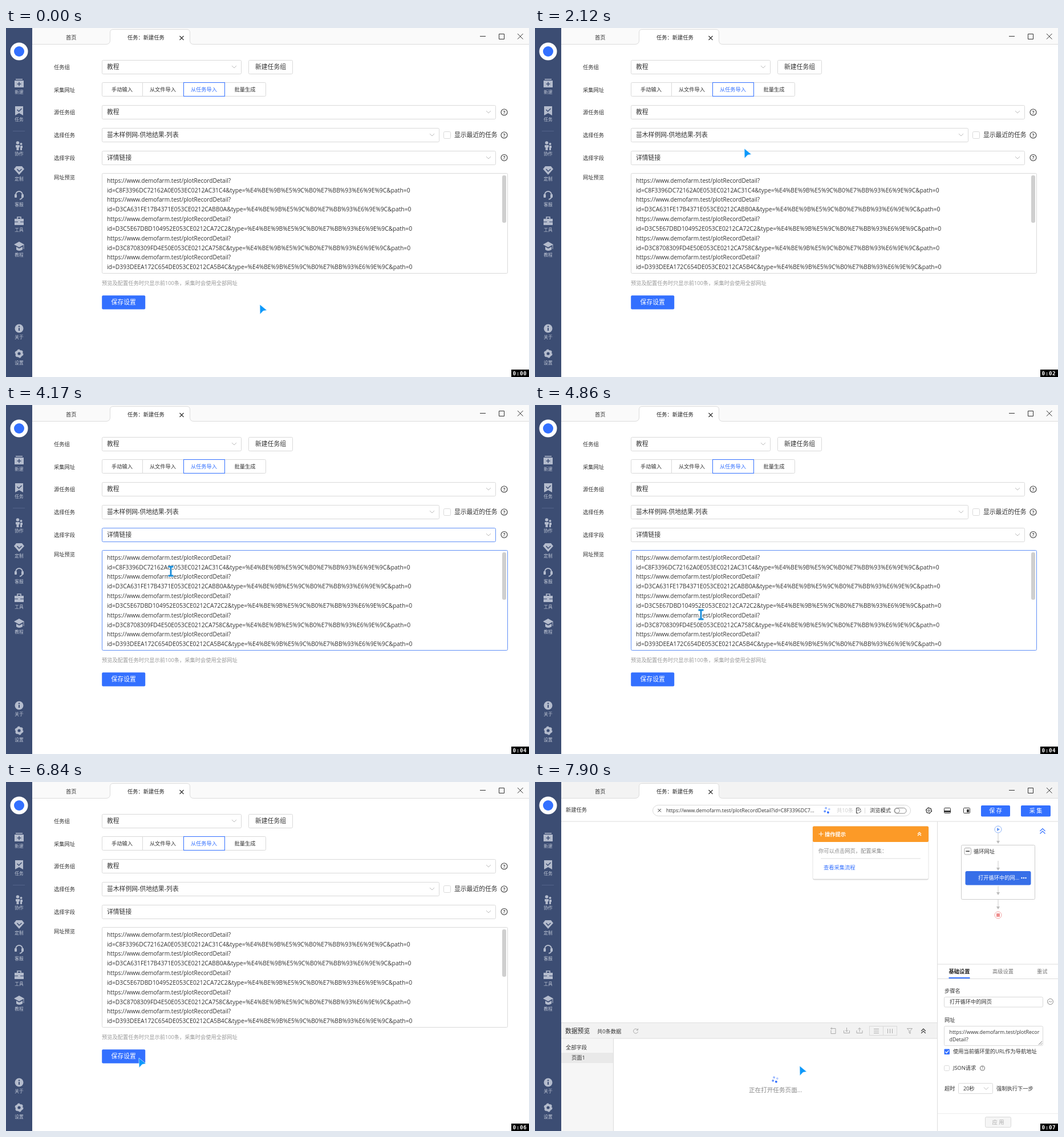
Write an HTML page that moves like this. It is 917 px wide and 611 px high and loops after 8 s.

```html
<!DOCTYPE html>
<html lang="zh">
<head>
<meta charset="utf-8">
<style>
  html, body { margin: 0; width: 100%; height: 100%; overflow: hidden; background: #fff; }
  svg { display: block; width: 917px; height: 611px; }
  text { font-family: "Open Sans", "Noto Sans CJK SC", "Noto Sans CJK", sans-serif; }
  .clock { font-family: "DejaVu Sans Mono", monospace; letter-spacing: .6px; }
</style>
</head>
<body>
<svg id="stage" viewBox="0 0 917 611"></svg>
<script>
const BLUE = '#3370ff', INK = '#333', GREY = '#999', LINE = '#d9d9d9', ICON = '#b4bccd', HOVER = '#5f8ff6';

// x is the left edge unless an anchor is given; y is the vertical middle
const text = (x, y, s, size = 9.25, fill = INK, opt = '') =>
  `<text x="${x}" y="${y + size * .37}" font-size="${size}" fill="${fill}" ${opt}>${s.replace(/&/g, '&amp;')}</text>`;
const mid = (x, y, s, size, fill, opt = '') => text(x, y, s, size, fill, 'text-anchor="middle" ' + opt);
const rect = (x, y, w, h, fill, opt = '') =>
  `<rect x="${x}" y="${y}" width="${w}" height="${h}" fill="${fill}" ${opt}/>`;
const box = (x, y, w, h, stroke = LINE, r = 2, id = '') =>
  rect(x + .5, y + .5, w - 1, h - 1, '#fff', `stroke="${stroke}" rx="${r}" id="${id}"`);
const path = (d, stroke, w = 1, fill = 'none', opt = '') =>
  `<path d="${d}" stroke="${stroke}" stroke-width="${w}" fill="${fill}" ${opt}/>`;
const solid = (d, fill = ICON) => path(d, 'none', 0, fill);
const dot = (x, y, r, fill, opt = '') => `<circle cx="${x}" cy="${y}" r="${r}" fill="${fill}" ${opt}/>`;
const ring = (x, y, r, stroke, w = 1) => dot(x, y, r, 'none', `stroke="${stroke}" stroke-width="${w}"`);
const chevron = (x, y) => path(`M${x - 4} ${y - 2}l4 4 4-4`, '#bbb');
const upTwice = (x, y, c, s = 4) =>
  path(`M${x - s} ${y}l${s}-${s} ${s} ${s}m-${2 * s} ${s}l${s}-${s} ${s} ${s}`, c, 1.2);
const help = (x, y, r = 5.5, c = INK) => ring(x, y, r, c, 1.1) + mid(x, y, '?', r * 1.6, c, 'font-weight="600"');
const select = (x, y, w, label, id) =>
  box(x, y, w, 25, LINE, 2, id) + text(177, y + 12, label, 10.8) + chevron(x + w - 13, y + 12);
const button = (x, y, w, h, label, size) =>
  rect(x, y, w, h, BLUE, 'rx="2"') + mid(x + w / 2, y + h / 2, label, size, '#fff', 'font-weight="500"');

const HOST = 'https://www.demofarm.test/plotRecor', URL_HEAD = HOST + 'dDetail?';
const IDS = ['C8F3396DC72162A0E053EC0212AC31C4', 'D3CA631FE17B4371E053CE0212CABB0A',
  'D3C5E67DBD104952E053CE0212CA72C2', 'D3C8708309FD4E50E053CE0212CA758C',
  'D393DEEA172C654DE053CE0212CA5B4C'];
const URL_TAIL = '&type=%E4%BE%9B%E5%9C%B0%E7%BB%93%E6%9E%9C&path=0';

function sidebar() {
  const labels = [['新建', 112], ['任务', 160], ['协作', 220], ['定制', 264], ['客服', 309],
    ['工具', 353], ['教程', 397], ['关于', 541], ['设置', 586]];
  return rect(0, 0, 46, 611, '#3c4d73') + dot(23, 41, 15.5, '#fff') + dot(23, 41, 9, BLUE) +
    rect(12, 180, 21, 1, '#53638a') +
    solid('M17 89h12v1.5h-12zM15 92h16v12h-16z') + path('M23 94.500v7M19.500 98h7', '#3c4d73', 1.5) +
    solid('M16 137h14v16l-7-4-7 4z') + path('M19.500 143l3 3 5-5', '#3c4d73', 1.5) +
    dot(20.5, 201, 2.8, ICON) + solid('M17 205h7v4h-1.500v5h-4v-5h-1.500z') +
    dot(26.5, 203, 2, ICON) + solid('M25 206h4v4h-1v4h-3z') +
    solid('M18 242h10l4 5-9 10-9-10z') + path('M19.500 247l3.500 4 4.500-4', '#3c4d73', 1.5) +
    path('M17 294v-2a6 6 0 0 1 12 0v2q0 5-5 6', ICON, 1.8) +
    rect(15, 291, 4, 6, ICON, 'rx="1"') + rect(27, 291, 4, 6, ICON, 'rx="1"') +
    path('M20 334v-3h6v3', ICON, 1.6) + rect(15, 334, 16, 5, ICON) + rect(15, 340, 16, 5, ICON) +
    rect(21, 338, 4, 3, ICON) +
    solid('M14 379l9-5 9 5-9 5zM18 383l5 3 6-3v5q-6 4-11 0z') + path('M31 379v8', ICON) +
    dot(23, 526, 7.5, ICON) + rect(22, 525, 2, 5, '#3c4d73') + dot(23, 522.5, 1.2, '#3c4d73') +
    ring(23, 570, 4.6, ICON, 4) +
    dot(23, 570, 6.3, 'none', `stroke="${ICON}" stroke-width="2.4" stroke-dasharray="3.3"`) +
    labels.map(([s, y]) => mid(23, y, s, 7.7, '#c3cad8')).join('');
}

function titleBar() {
  return rect(46, 0, 871, 28, '#fafafa', 'id="strip"') +
    path('M46 28.500H176Q182.500 28 182.500 22V8Q182.500 2.500 188 2.500H317Q322.500 2.500 322.500 8V22Q322.500 28.500 329 28.500H917',
      '#dcdcdc', 1, '#fff') +
    text(105, 17, '首页') + text(213, 17, '任务：新建任务', 9.25, '#222', 'font-weight="500"') +
    path('M304.500 14l7 7m0-7l-7 7', INK, 1.2) +
    path('M831 14.500h10M864.500 10.500h9v9h-9zM897 10l9.500 9.500m0-9.500l-9.500 9.500', INK);
}

function form() {
  const labels = ['任务组', '采集网址', '源任务组', '选择任务', '选择字段'];
  const tab = (x, s, c) => mid(x, 108, s, 9.25, c);
  return rect(46, 29, 871, 582, '#fff') +
    labels.map((s, i) => text(84, 68.5 + i * 39.7, s)).join('') + text(84, 261.5, '网址预览') +
    select(168, 56, 245, '教程') + box(425, 56, 78, 25) + mid(464, 68, '新建任务组', 10.8) +
    box(168, 95, 288, 25) + path('M239.500 95v25', LINE) + box(311, 95, 73, 25, BLUE, 0) +
    tab(203.5, '手动输入') + tab(275, '从文件导入') + tab(347, '从任务导入', BLUE) + tab(419, '批量生成') +
    select(168, 135, 691, '教程', 'group') + help(873.5, 147.5) +
    select(168, 175, 592, '苗木样例网-供地结果-列表', 'task') +
    box(767, 181, 13, 13) + text(786, 187, '显示最近的任务', 10.8) + help(873.5, 187.5) +
    select(168, 215, 691, '详情链接', 'field') + help(873.5, 227) +
    box(168, 254, 712, 176, LINE, 2, 'area') + rect(870, 258, 7, 83, '#cfcfcf', 'rx="3"') +
    IDS.map((id, i) => text(177, 267 + i * 33.65, URL_HEAD, 10.1) +
      text(177, 283.8 + i * 33.65, 'id=' + id + URL_TAIL, 10.32)).join('') +
    text(168, 447, '预览及配置任务时只显示前100条，采集时会使用全部网址', 9.25, GREY) +
    button(168.2, 468.2, 76, 24.4, '保存设置', 10.8);
}

const spinner = (x, y) => `<g class="spin" data-at="${x},${y}">` +
  [[-1, -1, 1], [1, -1, .75], [1, 1, .5], [-1, 1, .35]].map(([a, b, o]) =>
    dot(a * 3, b * 3, 1.9, BLUE, `opacity="${o}"`)).join('') + '</g>';

const arrow = (y1, y2) => path(`M812 ${y1}V${y2 - 4}`, '#ccc') + solid(`M809 ${y2 - 5}h6l-3 5z`, '#bbb');

function toolbar() {
  return text(54, 49, '新建任务') + box(206, 40, 453, 20, LINE, 10) +
    path('M215.500 47l5.500 5.500m0-5.500l-5.500 5.500', INK) +
    text(230, 50, URL_HEAD + 'id=C8F3396DC7...', 8.75) + spinner(512, 49.5) +
    text(529, 50, '共10条', 9.25, '#ccc') +
    path('M563.500 45.500h5l2 2v2M563.500 45.500v9h3M565 49h4M568 54.500l4-4', INK) + path('M578.500 45v10', LINE) +
    text(587, 50, '浏览模式') + rect(630, 45.5, 21, 9.5, '#fff', 'rx="4.7" stroke="#888"') + ring(635, 50.2, 4.2, '#888') +
    ring(690.5, 50, 4.4, INK, 1.2) + ring(690.5, 50, 1.6, INK) +
    dot(690.5, 50, 5.2, 'none', `stroke="${INK}" stroke-dasharray="2.1 3.34"`) +
    box(717, 45, 12, 10, INK, 1) + rect(718, 50, 10, 3, INK) +
    box(751, 45, 12, 10, INK, 1) + rect(757, 48, 4, 5, INK) +
    button(782, 41, 51, 19.5, '保 存', 10) + button(852, 41, 52, 19.5, '采 集', 10) +
    rect(46, 68.5, 871, 1, '#ddd');
}

function hint() {
  return rect(487, 79, 203, 92.5, '#d4d4d4', 'rx="3"') + rect(487, 78, 203, 92, '#fff', 'rx="2" stroke="#e4e4e4"') +
    rect(487, 77.5, 203, 27.5, '#fc9a27', 'rx="2"') + path('M497.500 91h8m-4-4v8', '#fff') +
    text(508, 91.5, '操作提示', 9.25, '#fff', 'font-weight="600"') + upTwice(674, 91, '#fff', 3) +
    text(497, 121, '你可以点击网页，配置采集：', 9.25, '#888') + rect(501, 133.5, 175, 1, '#ddd') +
    text(506, 149.5, '查看采集流程', 9.25, BLUE);
}

function flow() {
  return rect(705, 69, 1, 542, '#ddd') + ring(812, 83, 6, '#8db2f5') + solid('M810 80l5 3-5 3z', '#6a9bf5') +
    arrow(90, 108) + box(747, 110, 130, 96, '#ccc') + box(752.5, 115, 12.5, 12.5, '#aaa') +
    rect(755.5, 120.5, 6.5, 1.5, INK) + text(769, 121.5, '循环网址') + arrow(138, 155) +
    rect(754.5, 156, 115, 24.5, '#376fe8', 'rx="3"') +
    text(777, 168, '打开循环中的网...', 9.25, '#fff', 'font-weight="500"') +
    [853.5, 857, 860.5].map(x => dot(x, 168, 1.2, '#fff')).join('') +
    arrow(182, 198) + arrow(206, 223) + ring(812, 233, 6, '#f3a5a5') + rect(809, 230, 6, 6, '#ee8f8f') +
    upTwice(890, 86, BLUE, 4.5);
}

function settings() {
  return rect(706, 318.5, 211, 1, '#ddd') + rect(706, 344, 211, 1, '#ddd') +
    text(725.5, 332, '基础设置', 9.25, '#222', 'font-weight="600"') + rect(725.5, 342, 37, 2, BLUE) +
    text(802, 332, '高级设置', 9.25, '#777') + text(880, 332, '重试', 9.25, '#777') +
    text(718, 366, '步骤名') + box(717, 376, 174, 18.5) + text(727, 385, '打开循环中的网页') +
    ring(903.5, 384.5, 5, '#888') + path('M900.500 385.500l2-2 2 2 2-2', '#888') +
    text(718, 417, '网址') + box(717, 427, 174, 35) + text(726.5, 437.5, HOST, 8.9) + text(726.5, 451, 'dDetail?', 8.9) +
    path('M883 460l6-6M886.500 460l2.500-2.500', '#777') +
    rect(717.5, 467.5, 9.5, 9.5, BLUE, 'rx="1"') + path('M719.500 472l2 2.500 4-4.500', '#fff', 1.3) +
    text(733, 472, '使用当前循环里的URL作为导航地址') +
    box(717, 496, 10, 10) + text(733, 501, 'JSON请求') + help(784.5, 501, 4, '#777') +
    text(718, 536.5, '超时') + box(742, 527, 61, 19) + text(751, 536.5, '20秒') + chevron(791, 536.5) +
    text(809, 536.5, '强制执行下一步') + rect(706, 580, 211, 1, '#eee') +
    rect(789.5, 586.5, 45, 18, '#f5f5f5', `rx="2" stroke="${LINE}"`) + mid(812, 595.5, '应 用', 9.25, '#aaa');
}

function preview() {
  const c = '#aaa';
  return rect(46, 421.5, 659, 27.5, '#f2f2f2') + rect(46, 421, 659, 1, '#ddd') + rect(46, 448.5, 659, 1, '#ddd') +
    text(53, 436, '数据预览', 10.8, '#222', 'font-weight="500"') + text(109, 436.5, '共0条数据') +
    path('M180 434a4 4 0 1 0 .500 3M180.500 431.500v3h-3', c) +
    path('M521 431.500h6v9h-8v-6M518 431.500h4M520 429.500v4', c) +
    path('M541.500 435v4.500h10v-4.500M546.500 430v7m-2.500-2.500l2.500 2.500 2.500-2.500', c) +
    path('M564 435v4.500h10v-4.500M569 437.500v-7m-2.500 2.500l2.500-2.500 2.500 2.500', c) +
    rect(586.5, 427.5, 48, 16, '#f2f2f2', `stroke="${LINE}"`) + path('M610.500 428v15', LINE) +
    path('M594 432.500h9m-9 3.500h9m-9 3.500h9M618.500 432v8m4-8v8m4-8v8', c) +
    path('M652.500 431.500h9l-3.500 4v5l-2-1.500v-3.500z', c) + upTwice(681, 436, INK, 3.8) +
    rect(46, 449.5, 91, 162, '#f6f6f6') + rect(46, 474, 91, 18, '#e9e9e9') + rect(137, 449, 1, 162, '#ddd') +
    text(54, 464.5, '全部字段') + text(64, 483, '页面1') +
    spinner(421, 521) + text(375, 539, '正在打开任务页面...', 10.6, '#888');
}

const $ = id => document.getElementById(id);
const BEAM = 'M-4.500-8h3.500L0-7l1-1h3.500M0-7V7M-4.500 8h3.500L0 7l1 1h3.500';
$('stage').innerHTML = titleBar() + sidebar() + `<g id="form">${form()}</g>` +
  `<g id="editor">${rect(46, 29, 871, 582, '#fff')}${toolbar()}${hint()}${flow()}${settings()}${preview()}</g>` +
  path('M0 0L12.500 10.300 6 11.300 .300 17.300z', '#fff', .6, '#0d99fa', 'id="arrow"') +
  `<g id="beam">${path(BEAM, '#fff', 4.5)}${path(BEAM, '#168bd8', 2.8)}</g>` +
  rect(886, 598, 31, 13, '#000') +
  text(888.5, 604.5, '0:00', 9.3, '#fff', 'id="clock" class="clock" font-weight="700"');

const LOOP = 8000, STEP = 129.6, START = 280, OPEN = 6960;

// time, x, y of the pointer
const TRACK = [[0, 445, 484], [150, 445, 484], [540, 425, 400], [930, 375, 220], [1230, 352, 122], [1440, 347, 107],
  [1700, 350, 110], [1960, 360, 145], [2094, 367, 211], [2300, 362, 206], [2530, 330, 194], [2870, 262, 186],
  [3200, 247, 187], [3390, 249, 221], [3680, 252, 228], [3950, 262, 230], [4168, 289, 291], [4600, 305, 335],
  [4900, 285, 380], [5200, 225, 465], [5590, 190, 485], [5780, 194, 484], [6112, 206, 486],
  [6440, 206, 486], [6760, 233, 483], [7400, 464, 497], [8000, 464, 497]];

// when each control shows its highlighted border
const GLOW = {
  area: [[410, 930], [4150, 5180]], field: [[900, 1050], [3520, 4300]],
  task: [[1000, 1180], [2520, 3650]], group: [[1120, 1310], [1830, 2040]]
};

function pointer(t) {
  const i = Math.max(1, TRACK.findIndex(k => k[0] >= t));
  const [t0, x0, y0] = TRACK[i - 1], [t1, x1, y1] = TRACK[i];
  const p = (t - t0) / (t1 - t0);
  return [x0 + (x1 - x0) * p, y0 + (y1 - y0) * p];
}

const show = (id, on) => $(id).setAttribute('display', on ? 'inline' : 'none');

function draw(now) {
  const t = now % LOOP;
  const held = t < START ? 0 : START + Math.floor((t - START) / STEP) * STEP;
  const [x, y] = pointer(held).map(Math.round);
  const opened = t >= OPEN, typing = !opened && y > 254 && y < 430;

  show('form', !opened);
  show('editor', opened);
  show('arrow', !typing);
  show('beam', typing);
  for (const id of ['arrow', 'beam']) $(id).setAttribute('transform', `translate(${x} ${y})`);
  for (const id in GLOW)
    $(id).setAttribute('stroke', GLOW[id].some(([a, b]) => held >= a && held < b) ? HOVER : LINE);
  $('strip').setAttribute('fill', opened ? '#f3f3f3' : '#fafafa');
  document.querySelectorAll('.spin').forEach(g =>
    g.setAttribute('transform', `translate(${g.dataset.at}) rotate(${20 + held * .3})`));
  $('clock').textContent = '0:0' + Math.floor(t / 1000);
}

const begin = performance.now();
function loop() {
  draw(performance.now() - begin);
  requestAnimationFrame(loop);
}
loop();
</script>
</body>
</html>
```
